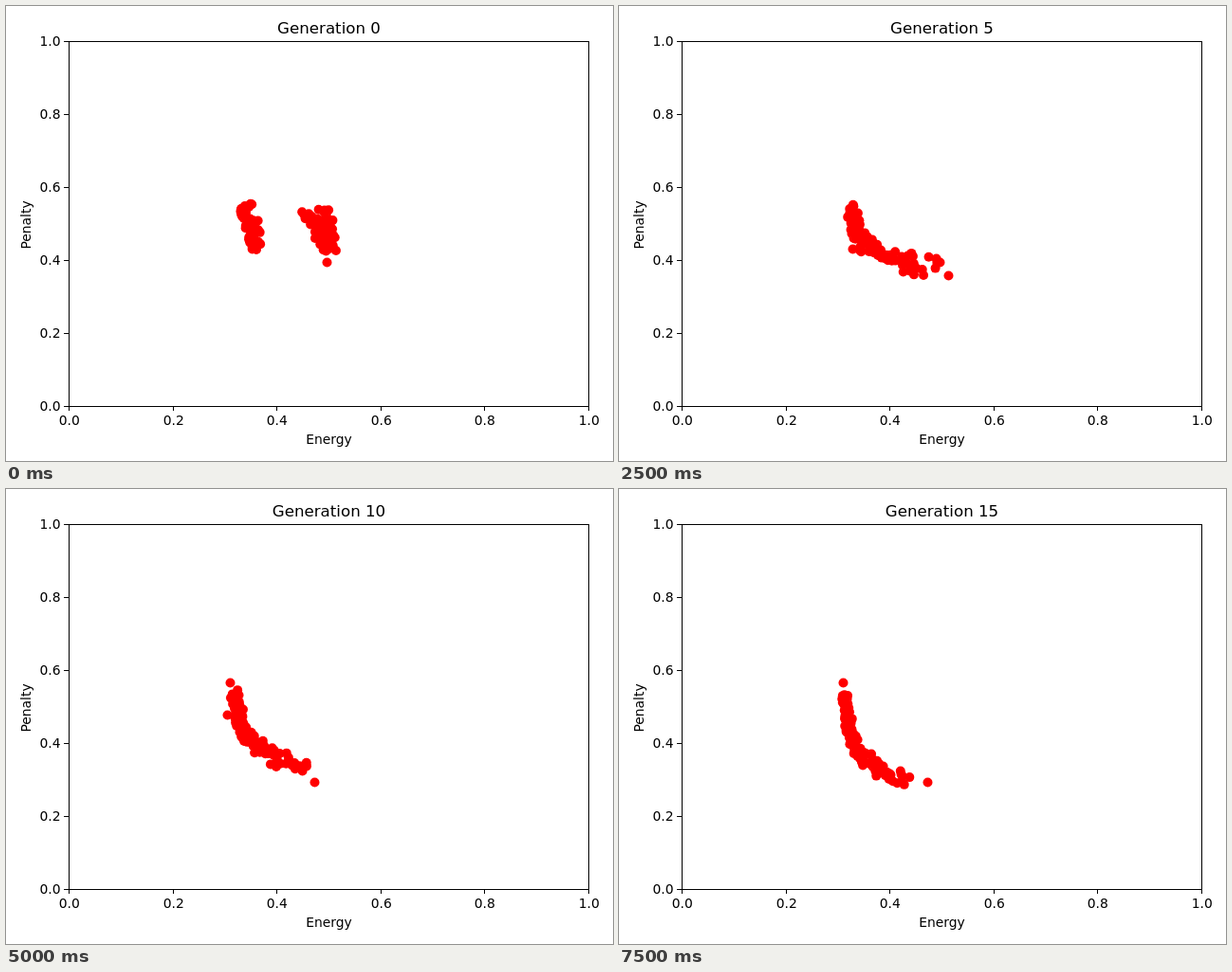
Recreate the animation shown at these times as an HTML page with a canvas. Size 640 by 480 pixels, loop 8 s.

```html
<!DOCTYPE html>
<html lang="en">
<head>
<meta charset="utf-8">
<title>Energy and penalty by generation</title>
<style>
html, body { margin: 0; width: 100%; height: 100%; overflow: hidden; background: #fff; }
canvas { display: block; }
</style>
</head>
<body>
<canvas id="stage" width="640" height="480"></canvas>
<script>
const ctx = document.getElementById('stage').getContext('2d');
const STEP = 500, COUNT = 16, SIZE = 100, LIFE = 3;
const LEFT = 66, TOP = 37, WIDTH = 548, HEIGHT = 385;
const FONT = '"DejaVu Sans", sans-serif';

// Four points on the front, early and late.
const EARLY = [[245, 211], [257, 240], [282, 255], [345, 265]];
const LATE = [[236, 217], [242, 250], [258, 283], [305, 308]];

// The two starting clusters: spine from top to bottom, and half width.
const CLUSTERS = [
  { from: [254, 208], to: [264, 258], half: 10 },
  { from: [326, 213], to: [341, 258], half: 16 }
];

// Best dots survive long: x, y, first and last generation.
const ELITE = [
  [338, 270, 0, 5], [347, 284, 5, 7], [246, 256, 5, 11],
  [236, 204, 6, 15], [325, 309, 9, 15], [233, 238, 9, 13]
];

const mix = (a, b, t) => a + (b - a) * t;
const mixPoint = (p, q, t) => [mix(p[0], q[0], t), mix(p[1], q[1], t)];

function random(...seed) {
  const s = Math.sin(seed.reduce((sum, n, k) => sum + n * (12.9898 + 65.2432 * k), 1)) * 43758.5453;
  return s - Math.floor(s);
}

// Cubic through four evenly spaced points.
function curve(points, t) {
  const s = t * 3;
  const weights = [
    (1 - s) * (2 - s) * (3 - s) / 6,
    s * (2 - s) * (3 - s) / 2,
    s * (s - 1) * (3 - s) / 2,
    s * (s - 1) * (s - 2) / 6
  ];
  return [0, 1].map(axis => weights.reduce((sum, w, k) => sum + w * points[k][axis], 0));
}

function clusterDot(i, along, across) {
  const { from, to, half } = CLUSTERS[i % 5 < 2 ? 0 : 1];
  const [x, y] = mixPoint(from, to, along);
  return [x + across * half * (1 - 0.6 * along * along), y];
}

function frontDot(birth, along, across) {
  const progress = Math.max(0, (birth - 2) / 12) ** 0.8;
  const points = EARLY.map((p, k) => mixPoint(p, LATE[k], progress));
  const [x, y] = curve(points, along ** 1.1);
  const shift = across * mix(5, 2.8, progress) * (1 + along / 2);
  return [x + shift, y - shift];
}

// Each dot keeps its place for LIFE generations, then a new one takes its slot.
function dot(i, gen) {
  const birth = Math.max(0, gen - (gen + i) % LIFE);
  const along = (i + random(i, birth, 1)) / SIZE;
  const across = random(i, birth, 2) * 2 - 1;
  return birth ? frontDot(birth, along, across) : clusterDot(i, along, across);
}

function population(gen) {
  const dots = Array.from({ length: SIZE }, (_, i) => dot(i, gen));
  return dots.concat(ELITE.filter(([, , first, last]) => gen >= first && gen <= last));
}

function label(text, x, y, align = 'center', size = 13.89) {
  ctx.font = `${size}px ${FONT}`;
  ctx.textAlign = align;
  ctx.fillText(text, x, y);
}

function draw(gen) {
  ctx.fillStyle = '#fff';
  ctx.fillRect(0, 0, 640, 480);

  ctx.fillStyle = '#f00';
  for (const [x, y] of population(gen)) {
    ctx.beginPath();
    ctx.arc(x + 0.5, y + 0.5, 5, 0, Math.PI * 2);
    ctx.fill();
  }

  ctx.fillStyle = ctx.strokeStyle = '#000';
  ctx.strokeRect(LEFT + 0.5, TOP + 0.5, WIDTH, HEIGHT);
  for (let k = 0; k <= 5; k++) {
    const x = Math.round(LEFT + WIDTH * k / 5);
    const y = TOP + HEIGHT * (1 - k / 5);
    const text = (k / 5).toFixed(1);
    ctx.fillRect(x, TOP + HEIGHT, 1, 5);
    ctx.fillRect(LEFT - 5, y, 5, 1);
    label(text, x + 0.8, 442);
    label(text, 57.5, y + 5, 'right');
  }
  label('Energy', 340.5, 462);
  label(`Generation ${gen}`, 340.5, 29, 'center', 16.67);
  ctx.save();
  ctx.translate(26, 231);
  ctx.rotate(-Math.PI / 2);
  label('Penalty', 0, 0);
  ctx.restore();
}

const start = performance.now();
function tick() {
  draw(Math.floor((performance.now() - start) / STEP) % COUNT);
  requestAnimationFrame(tick);
}
tick();
</script>
</body>
</html>
```
